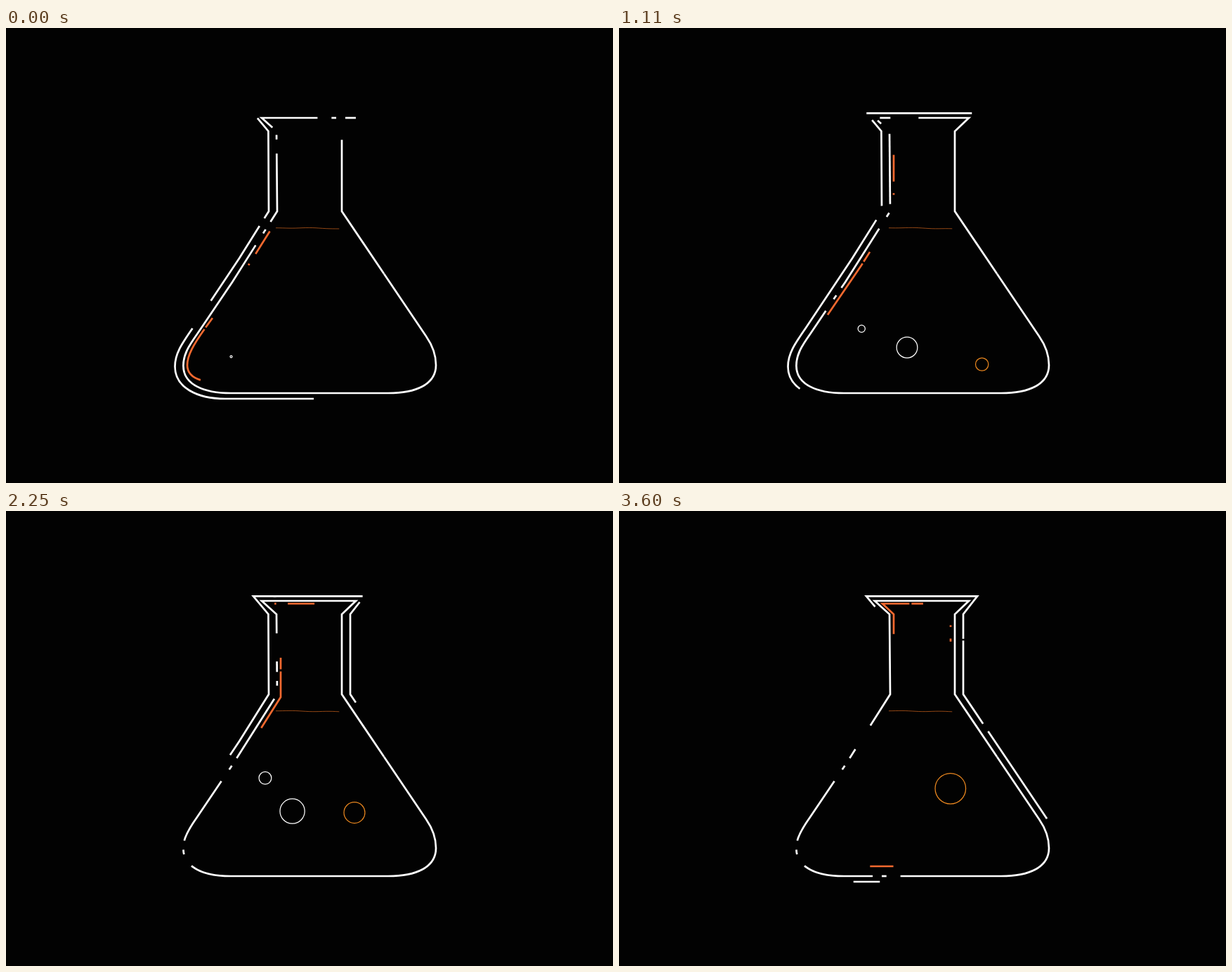
An HTML page for the animation above (3.63 s loop, 864x648 px).

```html
<!DOCTYPE html>
<html lang="en">
<head>
<meta charset="utf-8">
<title>Flask</title>
<style>
  html, body { margin: 0; width: 100%; height: 100%; overflow: hidden; background: #020202; }
  svg { display: block; width: 864px; height: 648px; }
  path, circle { fill: none; stroke-miterlimit: 10; }
</style>
</head>
<body>
<svg id="stage" viewBox="0 0 864 648"></svg>
<script>
const LOOP = 3630, STEP = 30;
const WHITE = '#fff', ORANGE = '#f4692f', AMBER = '#ea871f', LIQUID = '#d9691f';
const stage = document.getElementById('stage');

const GLASS = 'M538 350L478 261V147L498 128H364L385 147L386 261L322 362L272 436' +
  'C260 453 252.4 465 252.4 481C252.4 508 282 520 320 520H544' +
  'C583 520 612 508 612 480C612 465 607 452 598 439L538 350';
const OUTER = 'M613 444L490 261V147L510 121.4H352L373.4 147L374 261L332 328L266 427' +
  'C250 450 240.5 464 240.5 482C240.5 512 272 528 312 528H438';
const INNER = 'M472 230V147L487 132H375L391 147V265L345 338L294 413' +
  'C272 443 258 463 258 480C258 500 280 506 322 506H421';

function add(tag, attrs) {
  const el = document.createElementNS('http://www.w3.org/2000/svg', tag);
  for (const key in attrs) el.setAttribute(key, attrs[key]);
  return stage.appendChild(el);
}

// Turns alternating dash and gap lengths into [from, to] spans.
function dashes(start, lengths) {
  const spans = [];
  let at = start;
  lengths.forEach((len, n) => {
    if (n % 2 === 0) spans.push([at, at + len]);
    at += len;
  });
  return spans;
}

// Shows only the given spans of a path.
function line(d, stroke, spansAt) {
  const makePart = () => add('path', { d, stroke, 'stroke-width': 2.7 });
  const parts = [makePart()];
  const length = parts[0].getTotalLength();
  return i => spansAt(i, length).forEach(([from, to], n) => {
    const el = parts[n] || (parts[n] = makePart());
    const a = Math.max(0, from), size = Math.min(to, length + 1) - a;
    el.style.display = size > 0 ? '' : 'none';
    if (size > 0) el.setAttribute('stroke-dasharray', `0 ${a} ${size} 9999`);
  });
}

// Steps since the outlines passed the start of their path.
const wrapped = i => Math.max(0, i - 98.6);

const GROUP = [12.9, 6.7, 19.9, 100];
const glass = line(GLASS, WHITE, (i, length) => {
  const solid = 209 + 3.1 * i;
  return dashes(0, [solid, 40, 15, ...GROUP, ...GROUP, ...GROUP.slice(0, 3), length]);
});

const outer = line(OUTER, WHITE, (i, length) => {
  const k = wrapped(i), tail = 5.12 * i;
  return [
    ...dashes(534.2 - 4.43 * i, [150, 13, 127]),
    [871.3 - tail + 1.84 * k, 1153.8 - tail],
    [length - 5.12 * k, length - 3.28 * k]
  ];
});

const inner = line(INNER, ORANGE, (i, length) => {
  const k = wrapped(i);
  const spans = dashes(385.2 - 3.15 * i, [38, 16.5, 2.5, 91, 16.5, 3, 88.5]);
  spans[0][0] += 1.65 * k;
  return [...spans, [length - 3.13 * k, length - 1.5 * k]];
});

const surface = add('path', { stroke: LIQUID, 'stroke-width': 0.9, 'stroke-opacity': 0.75 });
function drawSurface(i) {
  const points = [];
  for (let u = 0; u <= 1; u += 0.05) {
    const wave = 0.6 * Math.sin(u * 9 - i * 0.13) * Math.sin(Math.PI * u);
    points.push(`${384 + 95 * u} ${284.7 + 1.3 * u * u + wave}`);
  }
  surface.setAttribute('d', 'M' + points.join('L'));
}

// Floats through points spaced evenly in time while it grows.
const LEG = 24;
function bubble(stroke, { from = 0, to = 119, origin = 0, size, growth, points }) {
  const el = add('circle', { stroke, 'stroke-width': 1.25 });
  return i => {
    const on = i >= from && i <= to;
    el.style.display = on ? '' : 'none';
    if (!on) return;
    const legs = (i - origin) / LEG, n = Math.floor(legs);
    const [a, b] = [points[n], points[n + 1]];
    const mix = axis => a[axis] + (b[axis] - a[axis]) * (legs - n);
    el.setAttribute('cx', mix(0));
    el.setAttribute('cy', mix(1));
    el.setAttribute('r', size + growth * i);
  };
}

const parts = [
  glass, outer, inner, drawSurface,
  bubble(WHITE, {
    to: 110, size: 1.5, growth: 0.1,
    points: [[320.5, 468], [341.5, 449], [349, 407.5], [368, 382], [379, 362], [386, 346]]
  }),
  bubble(WHITE, {
    from: 36, to: 92, origin: 36, size: 12.2, growth: 0.073,
    points: [[410, 455], [403.5, 441], [410.5, 418], [416, 398]]
  }),
  bubble(AMBER, {
    from: 8, size: 3.7, growth: 0.152,
    points: [[528, 512], [528.3, 491], [505, 467], [496.5, 431], [490, 414], [471, 394.5]]
  })
];

const start = performance.now();
function frame(now) {
  const t = Math.max(0, now - start) % LOOP;
  const i = Math.max(0, Math.floor(t / STEP) - 1);
  parts.forEach(draw => draw(i));
  requestAnimationFrame(frame);
}
frame(start);
</script>
</body>
</html>
```
